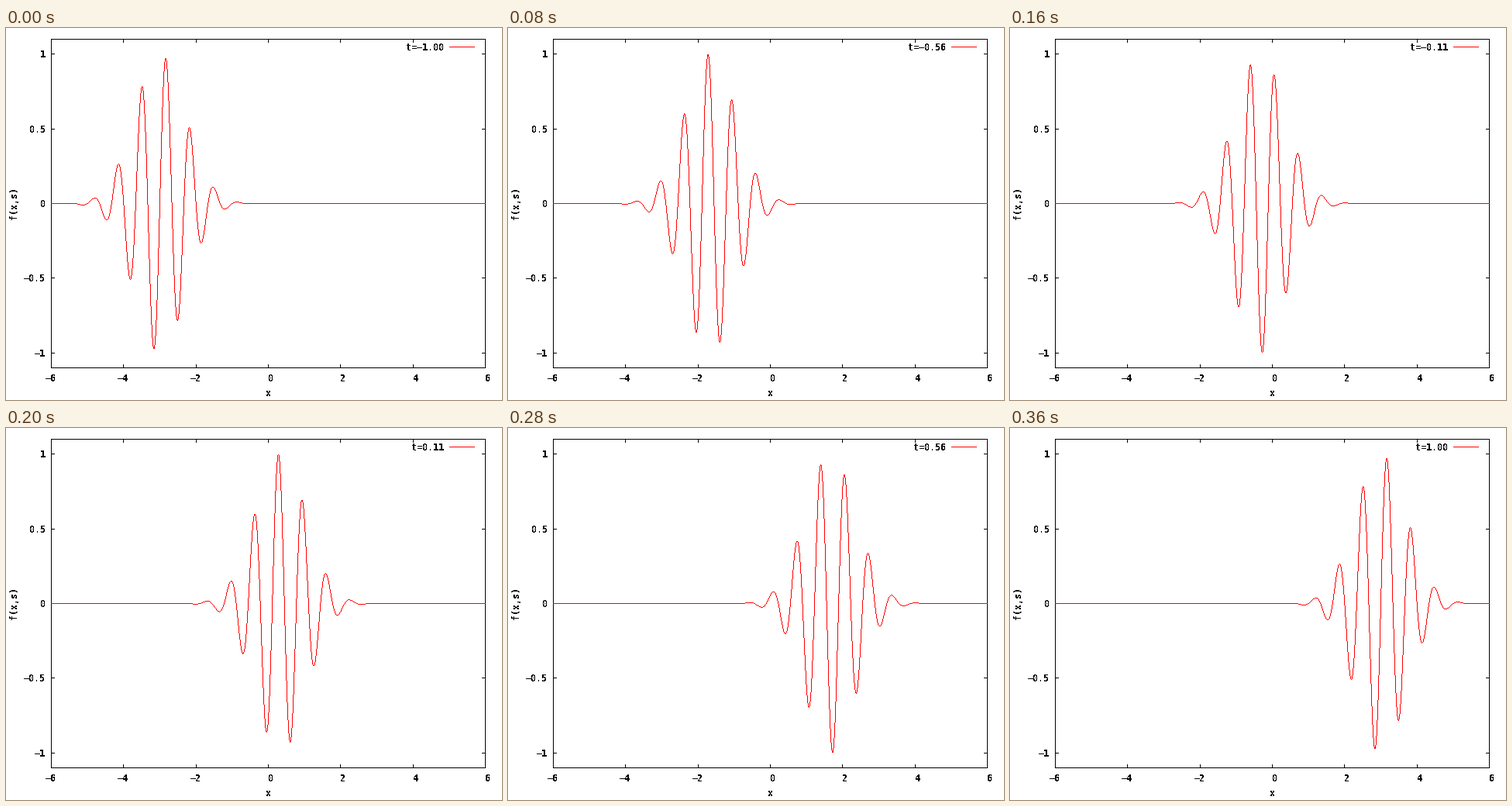
A matplotlib script that plays this animation: 640x480 px, repeating every 0.4 s.

```python
import numpy as np
import matplotlib.pyplot as plt
from matplotlib.animation import FuncAnimation

plt.rcParams["path.simplify"] = False

W, H, DPI = 640, 480, 100
PX = 72 / DPI                      # one pixel in points
LEFT, RIGHT, TOP, BOTTOM = 58, 618, 14, 438
FRAMES, INTERVAL = 10, 40
CHAR = 7                           # character advance in pixels
TICK = 4

fig = plt.figure(figsize=(W / DPI, H / DPI), dpi=DPI, facecolor="white")
ax = fig.add_axes([0, 0, 1, 1])
ax.set_xlim(0, W)
ax.set_ylim(H, 0)
ax.axis("off")


def to_px(x):
    return LEFT + (x + 6) / 12 * (RIGHT - LEFT)


def to_x(px):
    return (px - LEFT) / (RIGHT - LEFT) * 12 - 6


def to_py(y):
    return TOP + (1.1 - y) / 2.2 * (BOTTOM - TOP)


def stroke(xs, ys, color="black", z=2):
    """Aliased line; half a pixel wide so it fills only the pixels it crosses."""
    return ax.plot(xs, ys, color=color, lw=PX / 2, antialiased=False,
                   snap=False, zorder=z, solid_capstyle="projecting",
                   solid_joinstyle="miter")[0]


def line(xs, ys, color="black"):
    return stroke(np.rint(xs) + 0.5, np.rint(ys) + 0.5, color)


def text(x, y, s, **kw):
    return ax.text(x, y, s.replace("-", "\u2212"), family="DejaVu Sans Mono",
                   weight="bold", size=CHAR / 0.602 * PX, ha="left",
                   va="baseline", antialiased=False, **kw)


def wave(x, t):
    """Packet with group velocity 3 and phase velocity 1."""
    return np.exp(-(x - 3 * t) ** 2) * np.sin(3 * np.pi * (x - t))


def column_runs(t):
    """Vertical pixel run of the curve in each column, separated by gaps."""
    mid = np.rint(to_py(wave(to_x(cols), t)))
    a = to_py(wave(to_x(cols - 0.5), t))
    b = to_py(wave(to_x(cols + 0.5), t))
    top = np.minimum(mid, np.ceil(np.minimum(a, b)))
    bottom = np.maximum(mid, np.floor(np.maximum(a, b)))
    gap = np.full(len(cols), np.nan)
    return np.column_stack([top + 0.4, bottom + 0.6, gap]).ravel()


# frame, ticks and labels
line([LEFT, RIGHT, RIGHT, LEFT, LEFT], [TOP, TOP, BOTTOM, BOTTOM, TOP])

for v in range(-6, 7, 2):
    x, s = to_px(v), str(v)
    line([x, x], [BOTTOM, BOTTOM - TICK])
    line([x, x], [TOP, TOP + TICK])
    text(round(x) - CHAR * (len(s) // 2), 456, s)

for v in (-1, -0.5, 0, 0.5, 1):
    y, s = to_py(v), f"{v:g}"
    line([LEFT, LEFT + TICK], [y, y])
    line([RIGHT, RIGHT - TICK], [y, y])
    text(51 - CHAR * len(s), round(y) + 5, s)

text(335, 475, "x")
text(14, 247, "f(x,s)", rotation=90, rotation_mode="anchor")

# key and curve
line([572, 604], [24, 24], "red")
key = text(0, 29, "")
cols = np.arange(LEFT, RIGHT + 1)
curve = stroke(np.repeat(cols + 0.5, 3), column_runs(-1), "red", 3)


def update(i):
    t = -1 + 2 * i / (FRAMES - 1)
    curve.set_ydata(column_runs(t))
    label = f"t={t:.2f}"
    key.set_text(label.replace("-", "\u2212"))
    key.set_x(565 - CHAR * len(label))
    return curve, key


anim = FuncAnimation(fig, update, frames=FRAMES, interval=INTERVAL,
                     repeat=True, repeat_delay=0)
plt.show()
```
